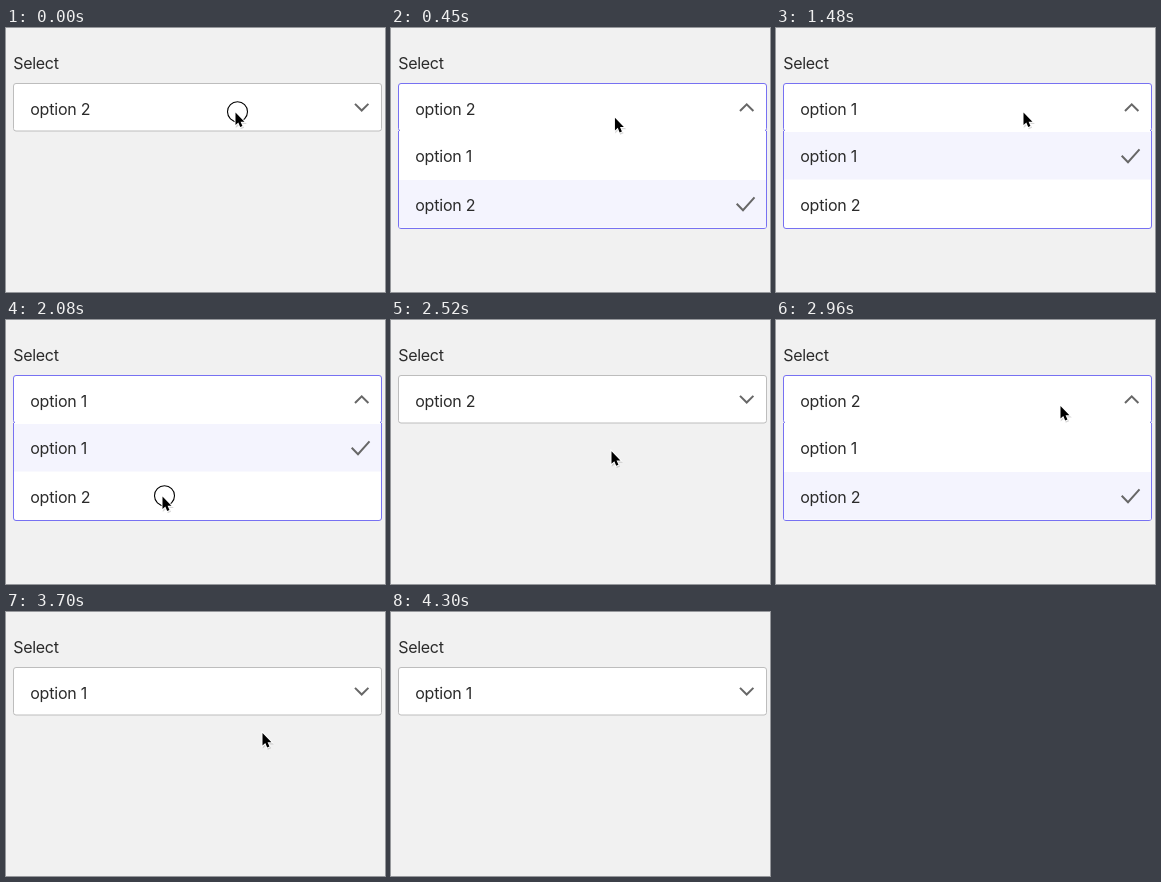
Animation, 379 px wide and 264 px high, one loop 4600 ms. Source, as an HTML page:

```html
<!DOCTYPE html>
<html lang="en">
<head>
<meta charset="utf-8">
<title>Select</title>
<style>
  html, body { margin: 0; width: 100%; height: 100%; overflow: hidden; background: #f1f1f1; }
  svg { display: block; width: 379px; height: 264px; }
  text { font: 16px Inter, Roboto, sans-serif; letter-spacing: -0.2px; fill: #2b2b2b; }
  .label { letter-spacing: -0.3px; }
  .icon { fill: none; stroke: #676767; stroke-width: 2; }
  .edge { fill: #fff; stroke: #bdbdbd; }
  .open .edge { stroke: #7771f2; }
</style>
</head>
<body>
<svg id="stage" viewBox="0 0 379 264">
  <rect width="379" height="264" fill="#f1f1f1"/>
  <text class="label" x="7.2" y="41">Select</text>
  <rect class="edge" x="7.5" y="55.5" width="368" height="47.5" rx="2.5"/>
  <g id="list">
    <path class="edge" d="M7.5 103V198a2.5 2.5 0 0 0 2.5 2.5H373a2.5 2.5 0 0 0 2.5 -2.5V103"/>
    <rect x="9" y="101.5" width="365" height="3" fill="#fff"/>
    <g id="chosen">
      <rect x="8" y="104" width="367" height="47.5" fill="#f4f4fe"/>
      <path class="icon" d="M345.7 127.8L352 134.2L363.5 121.3"/>
    </g>
    <text x="24.2" y="134">option 1</text>
    <text x="24.2" y="182.5">option 2</text>
  </g>
  <text id="value" x="24.2" y="87"></text>
  <path id="chevron" class="icon" d="M-6.7 -3.35L0 3.35L6.7 -3.35"/>
  <g id="cursor">
    <circle id="ring" cx="2" cy="-1.3" r="10" fill="none" stroke="#000" stroke-width="1.1"/>
    <g transform="translate(0 -.6) scale(.94)">
      <path d="M1 1.5V15L4 12.2L6 17L8.2 16L6.2 11.5H10.3Z" opacity=".15" stroke="#000" stroke-width="1.5"/>
      <path d="M0 0V13.5L3 10.7L5 15.5L7.4 14.5L5.4 9.9H9.5Z" stroke="#fff" paint-order="stroke" stroke-width="2"/>
    </g>
  </g>
</svg>
<script>
const LOOP = 4600, STEPS = 31, LEAD = 12;
const el = id => document.getElementById(id);

// Pointer stops; all but the last are clicks
const stops = [
  { step: 1, x: 229.5, y: 85 },
  { step: 4, x: 192, y: 121.5 },
  { step: 8, x: 247.5, y: 85 },
  { step: 14, x: 156.5, y: 177 },
  { step: 18, x: 284.5, y: 86.5 },
  { step: 23, x: 256.5, y: 121.5 },
  { step: 28, x: 345, y: 223 }
];
const clicks = stops.slice(0, -1).map(s => s.step);
const lastStep = stops[stops.length - 1].step;

const ease = k => k < 0.5 ? 4 * k ** 3 : 1 - 4 * (1 - k) ** 3;
const show = (node, on) => node.setAttribute("display", on ? "inline" : "none");
const move = (node, x, y) => node.setAttribute("transform", `translate(${x} ${y})`);

// Rests for half of each gap, then glides to the next stop
function pointAt(step) {
  const i = Math.max(1, stops.findIndex(s => s.step >= step));
  const from = stops[i - 1], to = stops[i];
  const part = (step - from.step) / (to.step - from.step);
  const k = ease(Math.max(0, part * 2 - 1));
  return [from.x + (to.x - from.x) * k, from.y + (to.y - from.y) * k];
}

function draw(time) {
  const now = time % LOOP;
  const step = Math.max(1, Math.floor((now + LEAD) * STEPS / LOOP));

  // Every first click opens the menu, every second one picks the other option
  const done = clicks.filter(c => c < step).length;
  const open = done % 2 === 1;
  const choice = Math.floor(done / 2) % 2 ? 1 : 2;

  el("stage").setAttribute("class", open ? "open" : "");
  el("value").textContent = "option " + choice;
  el("chevron").setAttribute("transform", `translate(355.7 ${open ? 79.7 : 79.2}) scale(1 ${open ? -1 : 1})`);
  show(el("list"), open);
  move(el("chosen"), 0, (choice - 1) * 48);

  const visible = step <= lastStep;
  show(el("cursor"), visible);
  show(el("ring"), clicks.includes(step));
  if (visible) move(el("cursor"), ...pointAt(step));
}

const start = performance.now();
function tick() {
  draw(performance.now() - start);
  requestAnimationFrame(tick);
}
tick();
</script>
</body>
</html>
```
